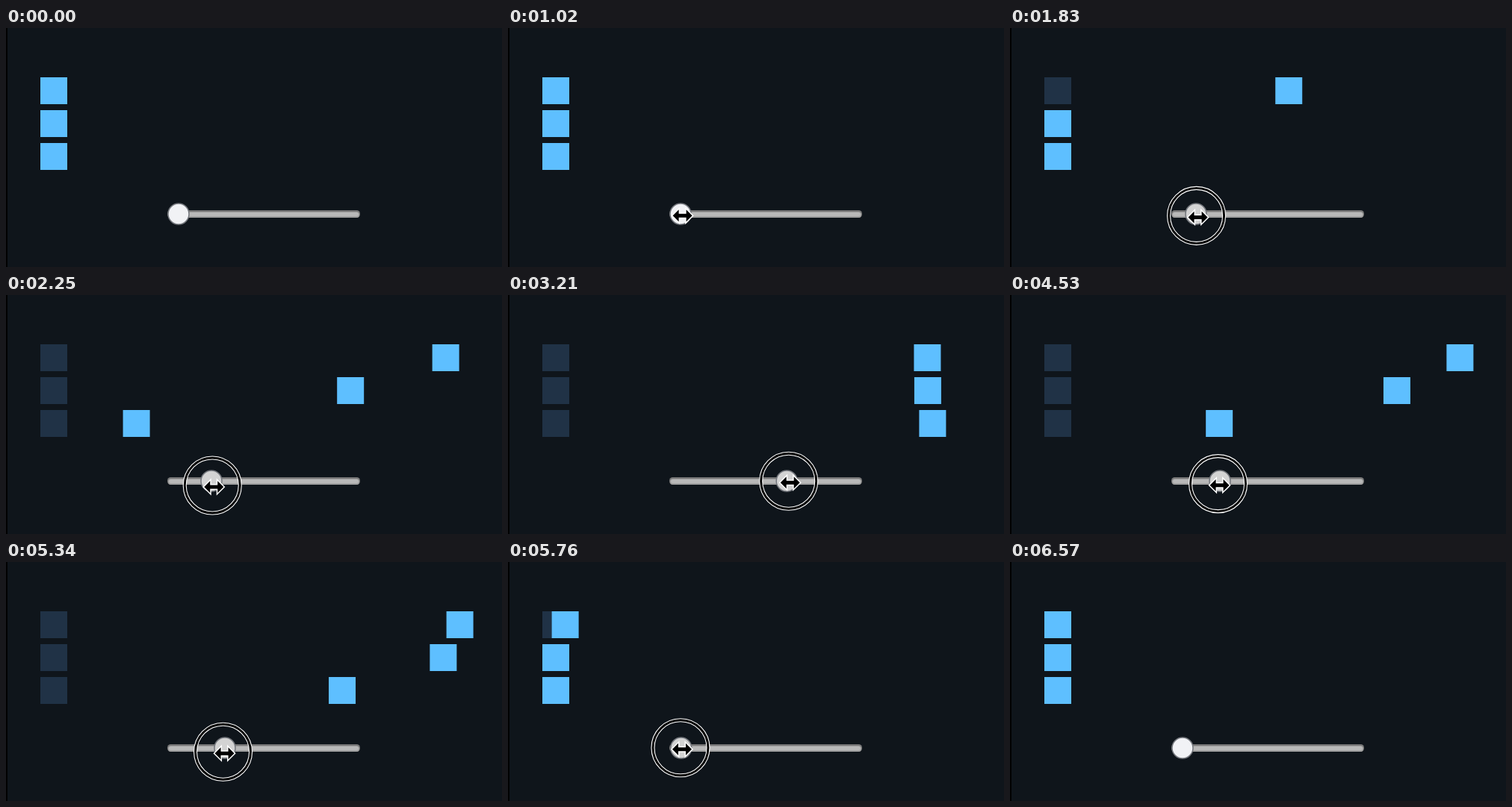
Animation of 664 by 320 pixels, one loop 6720 ms. Source, as an HTML page with a canvas:

```html
<!DOCTYPE html>
<html lang="en">
<head>
<meta charset="utf-8">
<title>Seek slider</title>
<style>
  html, body { margin: 0; width: 100%; height: 100%; overflow: hidden; background: #0f151b; }
  canvas { display: block; }
</style>
</head>
<body>
<canvas id="stage" width="664" height="320"></canvas>
<script>
const ctx = document.getElementById('stage').getContext('2d');
const LOOP = 6720, STEP = 30;
const MIN_X = 231, RANGE = 228, REST_Y = 248.5;   // thumb travel and height
const ENTER = 510, PRESS = 1080, DRAG = 1410, DROP = 5790, RELEASE = 5850, LEAVE = 6570;

// Thumb drag: time and x
const drag = [
  [DRAG, MIN_X], [1830, 249], [2250, 275], [3210, 373.2], [3800, MIN_X + RANGE],
  [4530, 281], [4720, 273], [5100, 301], [5340, 293], [DROP, MIN_X]
];

const clamp = u => Math.min(1, Math.max(0, u));
const mix = (a, b, u) => a + (b - a) * u;

function ease(t, from, to) {
  const u = clamp((t - from) / (to - from));
  return u * u * (3 - 2 * u);
}

// Slope at a drag point, flat at turning points
function slope(i) {
  const [a, b, c] = [drag[i - 1], drag[i], drag[i + 1]];
  if (!a || !c) return 0;
  const before = (b[1] - a[1]) / (b[0] - a[0]);
  const after = (c[1] - b[1]) / (c[0] - b[0]);
  return before * after <= 0 ? 0 : 2 * before * after / (before + after);
}

// Smooth curve through the drag points
function thumbAt(t) {
  if (t <= DRAG || t >= DROP) return MIN_X;
  const i = drag.findIndex(p => p[0] > t) - 1;
  const [t0, x0] = drag[i], [t1, x1] = drag[i + 1], d = t1 - t0;
  const u = (t - t0) / d, v = 1 - u;
  return mix(x0, x1, ease(t, t0, t1)) + d * u * v * (v * slope(i) - u * slope(i + 1));
}

function pointerAt(t) {
  if (t < PRESS) {
    const u = ease(t, ENTER, PRESS - STEP);
    return [mix(300, MIN_X, u), mix(345, REST_Y, u)];
  }
  if (t > RELEASE) {
    // Moves off in two strokes
    const u = 0.6 * ease(t, RELEASE, 6180) + 0.4 * ease(t, 6300, LEAVE);
    return [mix(MIN_X, 178, u), mix(REST_Y, 345, u)];
  }
  // While dragging, the hand leads the thumb and wavers up and down
  const x = thumbAt(t + 25);
  const sway = clamp(Math.min(t - DRAG, DROP - t) / 400);
  const waver = 2.6 * Math.cos(2 * Math.PI * (t - 2300) / 1000);
  return [x - 0.7 * sway, REST_Y + sway * (6.5 - 0.055 * (x - MIN_X) + waver)];
}

function elasticOut(t) {
  if (t <= 0) return 0;
  if (t >= 1) return 1;
  return 1 - 2 ** (-10 * t) * Math.cos(2 * Math.PI * t / 0.8);
}

function box(x, y, w, h, color, r = 0) {
  ctx.fillStyle = color;
  ctx.beginPath();
  ctx.roundRect(x, y, w, h, r);
  ctx.fill();
}

function circle(x, y, r, line, width, fill) {
  ctx.beginPath();
  ctx.arc(x, y, r, 0, 2 * Math.PI);
  if (fill) {
    ctx.fillStyle = fill;
    ctx.fill();
  }
  ctx.strokeStyle = line;
  ctx.lineWidth = width;
  ctx.stroke();
}

function drawSquares(progress) {
  for (let i = 0; i < 3; i++) {
    const y = 66 + 44 * i;
    box(46, y, 36, 36, '#203246');
    box(46 + 500 * elasticOut(progress * 1.2 - i * 0.1), y, 36, 36, '#5ebfff');
  }
}

function drawSlider(x, pressed) {
  box(216, 244, 258, 10, '#777', 4.5);
  box(217, 246, 256, 8, '#a0a0a0', 4);
  box(218, 247, 254, 5, '#b9b9b9', 2.5);
  circle(x, 249, 14, '#73767c', 1.5, pressed ? '#d3d3d3' : '#f1f2f5');
}

function drawRing(x, y) {
  circle(x, y, 37, '#000', 4);
  circle(x, y, 39, '#fff', 1.1);
  circle(x, y, 35, '#fff', 1.1);
}

// Double arrow: one half, then the same half turned around
function drawPointer(x, y) {
  const half = [[5, -2.5], [5, -8], [13, 0], [5, 8], [5, 2.5]];
  ctx.beginPath();
  for (const side of [1, -1]) {
    for (const [dx, dy] of half) ctx.lineTo(x + side * dx, y + side * dy);
  }
  ctx.closePath();
  ctx.strokeStyle = '#fff';
  ctx.lineWidth = 3;
  ctx.stroke();
  ctx.fillStyle = '#000';
  ctx.fill();
}

function draw(t) {
  const pressed = t >= PRESS && t < RELEASE;
  const thumbX = thumbAt(t);
  const [x, y] = pointerAt(t);

  box(0, 0, 664, 320, '#0f151b');
  box(0, 0, 2, 320, '#000');
  drawSquares((thumbX - MIN_X) / RANGE);
  drawSlider(thumbX, pressed);
  if (pressed) drawRing(x, y);
  if (t >= ENTER && t < LEAVE) drawPointer(x + 2, y + 2);
}

const start = performance.now();
function tick() {
  const t = (performance.now() - start) % LOOP;
  draw(Math.floor(t / STEP) * STEP);
  requestAnimationFrame(tick);
}
tick();
</script>
</body>
</html>
```
